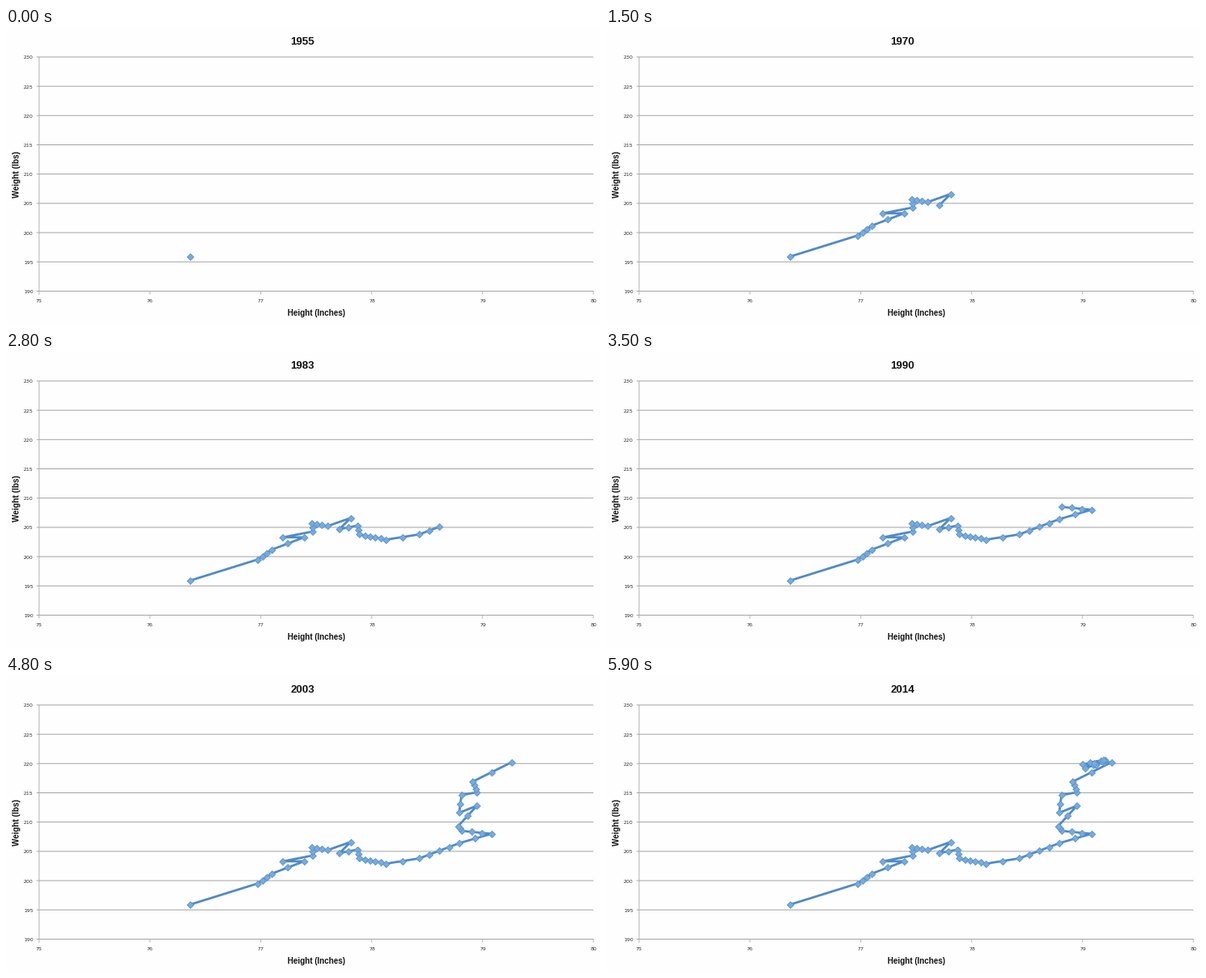
These frames come from a looping animation (713x356 px, 6.9 s). A matplotlib script:

```python
import matplotlib.pyplot as plt
import numpy as np
from matplotlib.animation import FuncAnimation

W, H, DPI = 713, 356, 64
PT = 72 / DPI  # points per pixel
STEP_MS, LOOP_MS = 100, 6900
GRID, AXIS, LINE, EDGE, FILL = "#a6a6a6", "#b4b4b4", "#4f8ac6", "#5c95cf", "#78abde"
LEFT, RIGHT, TOP, BOTTOM = 39.8, 705, 34.9, 316.5

# Turning points of the average player: year, height, weight.
TURNS = [
    (1955, 76.36, 195.9), (1956, 76.97, 199.5), (1959, 77.10, 201.2),
    (1961, 77.39, 203.3), (1962, 77.20, 203.3), (1963, 77.47, 204.3),
    (1965, 77.46, 205.7), (1968, 77.60, 205.2), (1969, 77.81, 206.6),
    (1970, 77.71, 204.7), (1972, 77.87, 205.3), (1974, 77.89, 203.8),
    (1979, 78.13, 202.9), (1981, 78.43, 203.8), (1985, 78.79, 206.4),
    (1987, 79.08, 208.0), (1990, 78.81, 208.5), (1992, 78.78, 209.3),
    (1994, 78.95, 212.8), (1995, 78.79, 211.6), (1997, 78.81, 214.6),
    (1998, 78.95, 215.1), (2001, 78.91, 216.9), (2003, 79.26, 220.2),
]


def x_at(height):
    return LEFT + (RIGHT - LEFT) * (height - 75) / 5


def y_at(weight):
    return BOTTOM + (TOP - BOTTOM) * (weight - 190) / 40


def build_trail():
    turn_years, turn_heights, turn_weights = zip(*TURNS)
    years = np.arange(1955, 2015)
    heights = np.interp(years, turn_years, turn_heights)
    weights = np.interp(years, turn_years, turn_weights)

    # The last years hover along a short rising ridge.
    late = years > turn_years[-1]
    rng = np.random.default_rng(4)
    along = rng.uniform(0, 1, late.sum())
    heights[late] = 78.98 + 0.23 * along
    weights[late] = 219.3 + along + rng.uniform(-0.5, 0.5, late.sum())
    return years, x_at(heights), y_at(weights)


fig = plt.figure(figsize=(W / DPI, H / DPI), dpi=DPI, facecolor="#fefefe")
ax = fig.add_axes([0, 0, 1, 1])
ax.set(xlim=(0, W), ylim=(H, 0))
ax.axis("off")


def rule(xs, ys, color):
    ax.plot(xs, ys, color=color, lw=PT, solid_capstyle="butt",
            snap=False, zorder=1)


def label(x, y, text, size, **style):
    style = {"ha": "center", "va": "center", "color": "#111111",
             "family": "Liberation Sans", "weight": "bold", **style}
    return ax.text(x, y, text, fontsize=size * PT, **style)


def tick_label(x, y, value, **style):
    label(x, y, str(value), 6.3, family="DejaVu Sans", weight="normal",
          color="#333333", **style)


for weight in range(190, 231, 5):
    y = y_at(weight)
    rule([LEFT - 3, RIGHT], [y, y], GRID)
    tick_label(32.7, y + 1, weight, ha="right")

for height in range(75, 81):
    x = x_at(height)
    rule([x, x], [BOTTOM, BOTTOM + 4], AXIS)
    tick_label(x, 328, height)

rule([LEFT, LEFT], [TOP, BOTTOM], AXIS)
label(372.5, 342.5, "Height (Inches)", 9.6)
label(12.5, 175.5, "Weight (lbs)", 9.7, rotation=90)
title = label(356, 16.5, "", 13)

years, xs, ys = build_trail()
trail, = ax.plot([], [], color=LINE, lw=2.7 * PT, marker="D",
                 ms=5.2 * PT, mfc=FILL, mec=EDGE, mew=0.9 * PT,
                 solid_joinstyle="round", zorder=3)


def draw(frame):
    count = min(frame + 1, len(years))
    trail.set_data(xs[:count], ys[:count])
    title.set_text(str(years[count - 1]))
    return trail, title


anim = FuncAnimation(fig, draw, frames=LOOP_MS // STEP_MS, interval=STEP_MS,
                     repeat=True, repeat_delay=0)
plt.show()
```
